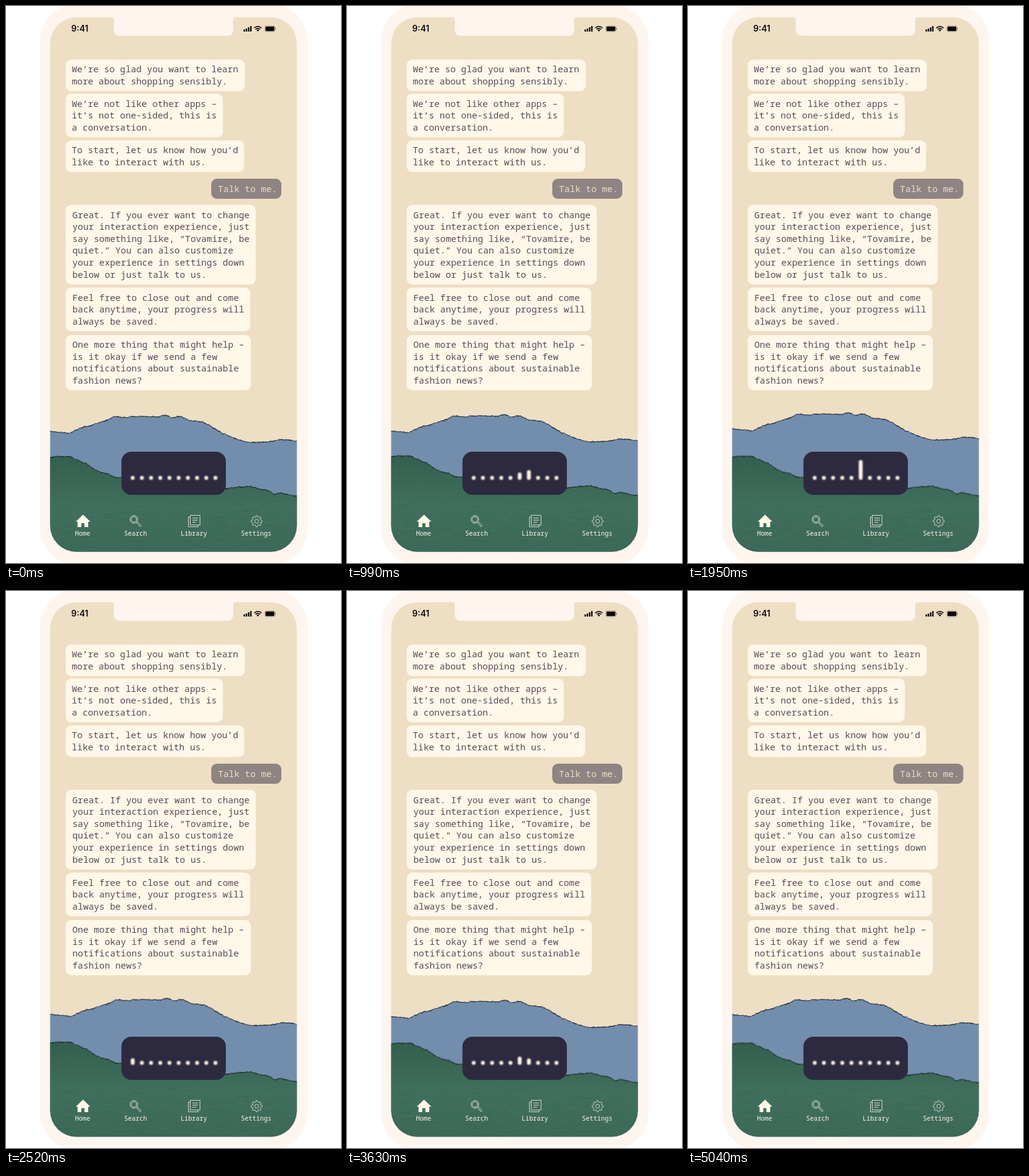
Write an HTML page that moves like this. It is 550 px wide and 916 px high and loops after 5.07 s.

```html
<!DOCTYPE html>
<html lang="en">
<head>
<meta charset="utf-8">
<title>Chat assistant</title>
<style>
  html, body { margin: 0; width: 100%; height: 100%; overflow: hidden; background: #fff; }
  svg { position: absolute; left: 0; top: 0; }
  p, .label { font-family: "Noto Sans Mono", "DejaVu Sans Mono", monospace; }
  p {
    position: absolute; left: 98px; margin: 0; padding: 6.5px 0 6.5px 10px;
    box-sizing: border-box; border-radius: 9px; white-space: nowrap;
    font-size: 14.7px; line-height: 19.65px; color: #584a57; background: #fff7e8;
  }
  p.late { padding-left: 11px; }
  p.reply { left: 336.5px; color: #eedec3; background: #8e8483; padding-left: 11.5px; }
  .clock { font: 600 14px Inter, Roboto, sans-serif; fill: #0b0b0d; }
  .label { font-size: 10.4px; font-weight: 500; fill: #fff7e8; text-anchor: middle; }
  .icon { fill: none; stroke: #d5ddce; stroke-width: 1; stroke-linejoin: round; }
  .voice { filter: blur(.9px); fill: #fbf2e2; }
  #blue { animation: blue 5070ms ease-in-out infinite; }
  #green { animation: green 5070ms ease-in-out infinite; }
  @keyframes blue {
    0% { transform: translate(0, 0); }
    19.5% { transform: translate(-3px, -1px); }
    38.5% { transform: translate(2px, -4px); }
    44% { transform: translate(3px, -4px); }
    59.2% { transform: translate(4px, -1px); }
    71.6% { transform: translate(-2px, 0); }
    88.2% { transform: translate(-4px, -2px); }
    99.4%, 100% { transform: translate(-1px, -3px); }
  }
  @keyframes green {
    0% { transform: translate(0, 0); }
    19.5% { transform: translate(-1px, -1px); }
    38.5% { transform: translate(0, -.5px); }
    59.2% { transform: translate(1px, 2px); }
    71.6%, 100% { transform: translate(0, 2.6px); }
  }
</style>
</head>
<body>
<svg width="550" height="916" viewBox="0 0 550 916">
  <defs>
    <clipPath id="screen"><rect x="72.5" y="18.5" width="405" height="879" rx="43"/></clipPath>
    <linearGradient id="meadow" x1="0" y1="0" x2="0" y2="1">
      <stop offset="0" stop-color="#335f4e"/>
      <stop offset=".45" stop-color="#416f5d"/>
      <stop offset="1" stop-color="#3a6756"/>
    </linearGradient>
  </defs>
  <rect x="56" y="-3" width="439" height="922" rx="60" fill="#fff5ef"/>
  <g clip-path="url(#screen)">
    <rect x="72" y="18" width="406" height="881" fill="#eedec3"/>
    <g id="blue"></g>
    <g id="green"></g>
  </g>
  <path d="M172 17H378Q373 18 373 24V39Q373 49 363 49H187Q177 49 177 39V24Q177 18 172 17Z" fill="#fff5ef"/>

  <text class="clock" x="107" y="42">9:41</text>
  <g fill="#0b0b0d">
    <rect x="390" y="38.5" width="2.4" height="3.5" rx=".6"/>
    <rect x="393.6" y="37" width="2.4" height="5" rx=".6"/>
    <rect x="397.2" y="35" width="2.4" height="7" rx=".6"/>
    <rect x="400.8" y="33" width="2.4" height="9" rx=".6"/>
    <path d="M413.5 42L411.3 39.7Q413.5 38 415.7 39.7Z"/>
    <rect x="426" y="33.8" width="14.5" height="7.4" rx="1.4"/>
    <rect x="425" y="32.8" width="16.5" height="9.4" rx="2.4" fill="none" stroke="#0b0b0d" stroke-width=".6" opacity=".5"/>
    <rect x="442" y="36" width="1" height="3" opacity=".5"/>
  </g>
  <path d="M407.5 36.2Q413.5 31.2 419.5 36.2M409.6 38.4Q413.5 35.2 417.4 38.4" fill="none" stroke="#0b0b0d" stroke-width="1.7"/>

  <rect x="189.5" y="733" width="171.5" height="71" rx="16" fill="#2d2a40"/>
  <g class="voice" id="voice"></g>

  <path d="M126.5 836.5L138.5 848H135V857H128.7V850.5H123.7V857H117.5V848H114.5Z" fill="#fff7e8"/>
  <g class="icon">
    <circle cx="210" cy="844.3" r="6.3"/>
    <circle cx="210" cy="844.3" r="4.4"/>
    <path d="M214.2 849.6L215.6 848.2L222 854.4L220.2 856.4Z"/>
    <path d="M302.5 837.5H318.5V853.5H302.5ZM302.5 840.5H299.5V856.5H315.5V853.5M306 842H315M306 845.5H315M306 849H312"/>
    <circle cx="411.5" cy="847.3" r="3.2"/>
    <path id="gear"/>
  </g>
  <g class="label">
    <text x="125.8" y="871.3">Home</text>
    <text x="212.7" y="871.3">Search</text>
    <text x="308.5" y="871.3">Library</text>
    <text x="410.8" y="871.3">Settings</text>
  </g>
</svg>

<p style="top:87.5px;width:294px">We’re so glad you want to learn<br>more about shopping sensibly.</p>
<p style="top:144px;width:258px">We’re not like other apps –<br>it’s not one-sided, this is<br>a conversation.</p>
<p style="top:220.5px;width:293px">To start, let us know how you’d<br>like to interact with us.</p>
<p class="reply" style="top:284px;width:115.5px">Talk to me.</p>
<p class="late" style="top:327px;width:312px">Great. If you ever want to change<br>your interaction experience, just<br>say something like, “Tovamire, be<br>quiet.” You can also customize<br>your experience in settings down<br>below or just talk to us.</p>
<p class="late" style="top:463px;width:303px">Feel free to close out and come<br>back anytime, your progress will<br>always be saved.</p>
<p class="late" style="top:540.5px;width:304px">One more thing that might help –<br>is it okay if we send a few<br>notifications about sustainable<br>fashion news?</p>

<script>
  const LOOP = 5070, STEP = 80;
  const $ = id => document.getElementById(id);

  function shape(parent, tag, attrs) {
    const el = document.createElementNS("http://www.w3.org/2000/svg", tag);
    for (const key in attrs) el.setAttribute(key, attrs[key]);
    return parent.appendChild(el);
  }

  let seed = 11;
  const random = () => (seed = seed * 16807 % 2147483647) / 2147483647;

  // Torn paper: a dark ragged rim behind a slightly lower coloured sheet.
  function paper(parent, ridge, fill, rim) {
    const upper = [], lower = [];
    for (let i = 1; i < ridge.length; i++) {
      const [x0, y0] = ridge[i - 1], [x1, y1] = ridge[i];
      for (let x = x0; x < x1; x += 2.5) {
        const y = y0 + (y1 - y0) * (x - x0) / (x1 - x0) + (random() - .5) * 1.6;
        upper.push(`${x} ${y.toFixed(1)}`);
        lower.push(`${x} ${(y + .7 + random() * 1.5).toFixed(1)}`);
      }
    }
    const close = points => `M${points.join("L")}L500 920L50 920Z`;
    shape(parent, "path", { d: close(upper), fill: rim });
    shape(parent, "path", { d: close(lower), fill });
  }

  // Faint brush strokes scattered over a sheet.
  function grain(parent, top, bottom, count, stroke) {
    let d = "";
    for (let i = 0; i < count; i++) {
      const x = 70 + random() * 400, y = top + random() * (bottom - top);
      d += `M${x.toFixed(1)} ${y.toFixed(1)}l${(4 + random() * 14).toFixed(1)} ${(random() * 2 - 1).toFixed(1)}`;
    }
    shape(parent, "path", { d, stroke, fill: "none", "stroke-width": 1, opacity: .13 });
  }

  paper($("blue"), [
    [60, 698], [72, 699], [103, 702], [122, 693], [142, 688], [162, 682], [178, 674],
    [196, 676], [216, 674], [248, 675], [262, 672], [271, 676], [286, 674], [302, 681],
    [322, 683], [338, 691], [352, 700], [374, 710], [397, 717], [432, 716], [452, 712],
    [478, 715], [494, 716]
  ], "#728eac", "#303b4a");

  paper($("green"), [
    [60, 742], [85, 740], [104, 740], [122, 748], [132, 752], [142, 759], [154, 766],
    [166, 768], [179, 774], [200, 777], [360, 793], [376, 791], [402, 789], [416, 794],
    [430, 796], [440, 802], [452, 800], [466, 804], [494, 807]
  ], "url(#meadow)", "#1d332f");
  grain($("green"), 815, 895, 150, "#24493c");
  grain($("green"), 815, 895, 150, "#6d9581");

  const teeth = Array.from({ length: 32 }, (_, i) => {
    const a = (i - .5) / 32 * 2 * Math.PI, r = i % 4 < 2 ? 9.2 : 7;
    return `${(411.5 + r * Math.cos(a)).toFixed(1)} ${(847.3 + r * Math.sin(a)).toFixed(1)}`;
  });
  $("gear").setAttribute("d", `M${teeth.join("L")}Z`);

  const bars = Array.from({ length: 10 }, (_, i) =>
    shape($("voice"), "rect", { x: 204.8 + i * 15.1, width: 6.4, rx: 3.2 }));

  // Each sweep lifts the bars one after another: time at the first bar, lift.
  const sweeps = [[544, 15], [1550, 26], [2570, 13], [3198, 11], [3858, 14]];

  function lift(bar, time) {
    return sweeps.reduce((sum, [start, height]) => {
      const gap = Math.abs(bar - (time - start) / STEP);
      return gap < 1 ? sum + height * Math.cos(gap * Math.PI / 2) ** 2 : sum;
    }, 0);
  }

  function draw() {
    const time = performance.now() % LOOP;
    bars.forEach((bar, i) => {
      const h = lift(i, time);
      bar.setAttribute("y", 772.7 - h);
      bar.setAttribute("height", 6.6 + h);
    });
    requestAnimationFrame(draw);
  }
  draw();
</script>
</body>
</html>
```
